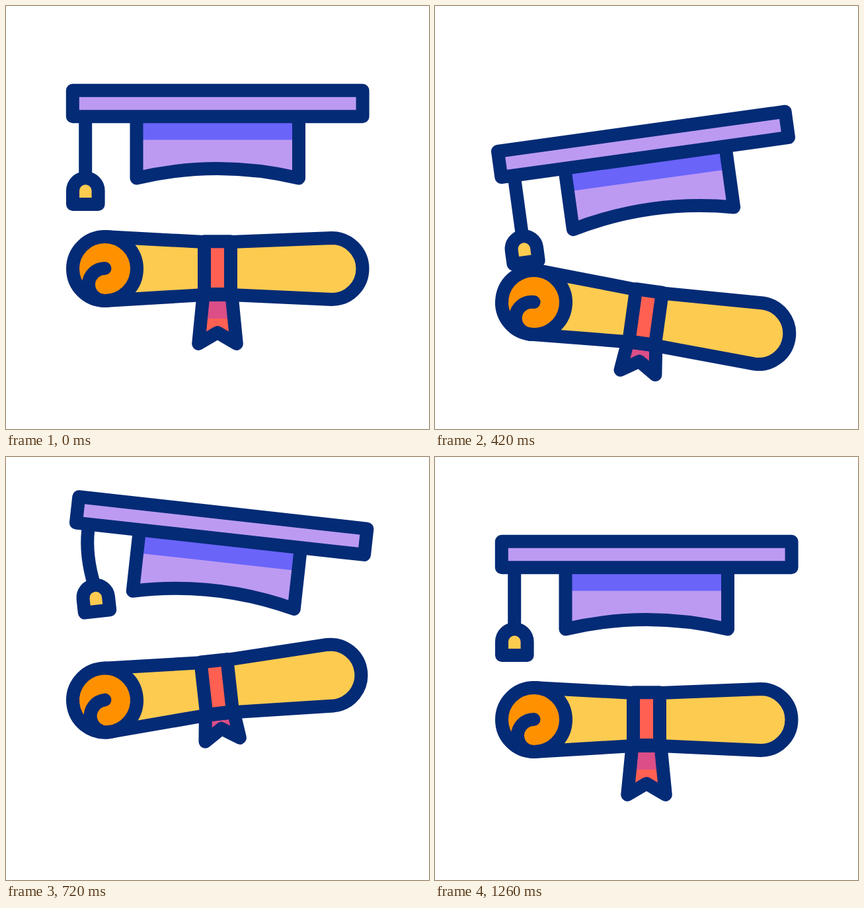
Recreate the animation shown at these times as an HTML page. Size 640 by 640 pixels, loop 1.82 s.

```html
<!DOCTYPE html>
<html lang="en">
<head>
<meta charset="utf-8">
<title>Graduation</title>
<style>
  html, body { margin: 0; width: 100%; height: 100%; overflow: hidden; background: #fff; }
  svg { display: block; width: 100%; height: 100%; }
  .line { stroke: #042b76; stroke-width: 20; stroke-linecap: round; stroke-linejoin: round; }
</style>
</head>
<body>
<svg viewBox="0 0 640 640" xmlns="http://www.w3.org/2000/svg">
  <defs>
    <clipPath id="tailClip"><path id="tailShape"/></clipPath>
  </defs>

  <g id="scroll">
    <g clip-path="url(#tailClip)">
      <rect x="280" y="430" width="80" height="90" fill="#ff6052"/>
      <rect id="shade" x="280" y="430" width="80" fill="#db4e87"/>
    </g>
    <path id="tail" class="line" fill="none"/>
    <path class="line" fill="#fdcb50"
      d="M149.5 349 L300 357 H340 L493 351 A46.5 46.5 0 0 1 493 444 L340 437 H300 L149.5 446 Z"/>
    <circle class="line" cx="149.5" cy="397.5" r="48.5" fill="#ff9100"/>
    <path class="line" fill="none" d="M149.5 446 A24.5 24.5 0 0 1 149.5 397"/>
    <path class="line" fill="#ff6052" d="M300 356.3 H340 V436 H300 Z"/>
  </g>

  <g id="cap">
    <path fill="#bc9af2" d="M197.5 167 V260.5 Q320 231.5 443 260.5 V167 Z"/>
    <rect x="197.5" y="167" width="245.5" height="35.5" fill="#6a64f9"/>
    <path class="line" fill="none" d="M197.5 167 V260.5 Q320 231.5 443 260.5 V167"/>
    <path id="cord" class="line" fill="none"/>
    <g id="tassel">
      <path class="line" fill="#fdcb50" d="M101 300 V279.5 A19.3 19.3 0 0 1 139.6 279.5 V300 Z"/>
    </g>
    <rect class="line" x="100.8" y="127.8" width="438.8" height="39.5" fill="#bc9af2"/>
  </g>
</svg>

<script>
const LOOP = 1820;
const $ = id => document.getElementById(id);
const smooth = x => x * x * (3 - 2 * x);

// Eased value between [time, value] keys, held after the last one.
function track(keys, t) {
  for (let i = 1; i < keys.length; i++) {
    const [t0, a] = keys[i - 1], [t1, b] = keys[i];
    if (t < t1) return a + (b - a) * smooth((t - t0) / (t1 - t0));
  }
  return keys[keys.length - 1][1];
}

const sway = (down, up) => [[0, 0], [400, down], [800, up], [1200, 0]];
const TILT = sway(8, -8);
const SCROLL_Y = sway(51.6, -38.8);
const CAP_Y = sway(44.2, -38);
const TAIL = [[0, 0], [600, 38.5], [1200, 0]];
const SWING = [[0, 0], [90, 18.8], [690, -13.7], [979, 20.5], [1260, 0]];

const place = (el, y, angle, cx, cy) =>
  el.setAttribute('transform', `translate(0 ${y}) rotate(${angle} ${cx} ${cy})`);

function drawTail(lift) {
  const inset = lift * 0.07, y = 511 - lift;
  const d = `M298.5 437 L${291.2 + inset} ${y} L320 ${y - 17} L${348.8 - inset} ${y} L341.5 437 Z`;
  $('tail').setAttribute('d', d);
  $('tailShape').setAttribute('d', d);
  $('shade').setAttribute('height', 43 - lift * 0.45);
}

function drawTassel(angle) {
  const r = angle * Math.PI / 180;
  const x = 120.2 - 84 * Math.sin(r), y = 176 + 84 * Math.cos(r);
  $('cord').setAttribute('d', `M120.2 172 V176 Q120.2 215 ${x} ${y}`);
  $('tassel').setAttribute('transform', `rotate(${angle} 120.2 176)`);
}

function draw(t) {
  const tilt = track(TILT, t);
  place($('scroll'), track(SCROLL_Y, t), tilt, 149.5, 397.5);
  place($('cap'), track(CAP_Y, t), -tilt, 450, 194.5);
  drawTail(track(TAIL, t));
  drawTassel(track(SWING, t));
}

let start;
function tick(now) {
  if (start === undefined) start = now;
  draw((now - start) % LOOP);
  requestAnimationFrame(tick);
}
draw(0);
requestAnimationFrame(tick);
</script>
</body>
</html>
```
